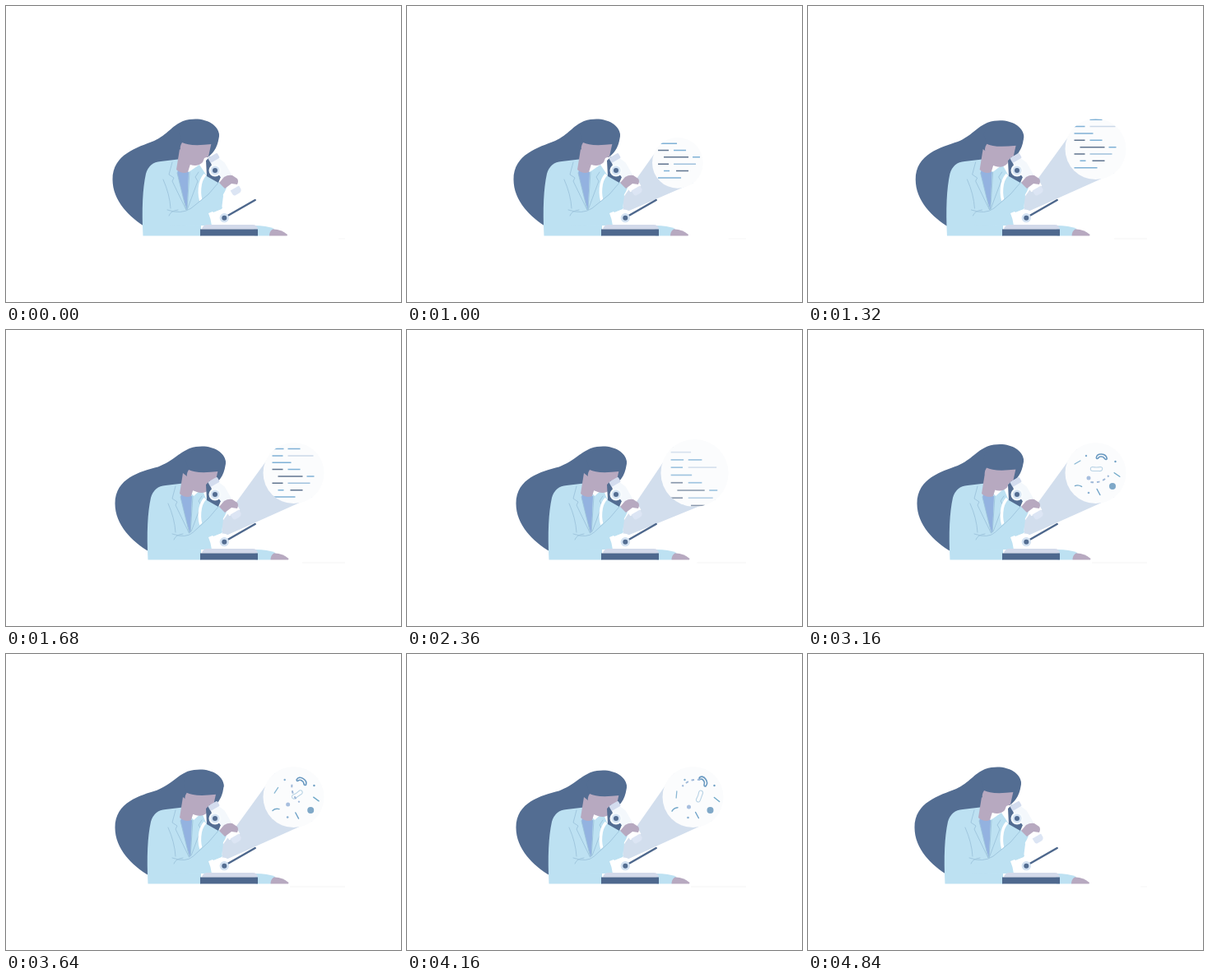
An HTML page for the animation above (5000 ms loop, 480 by 360 pixels).

```html
<!DOCTYPE html>
<html lang="en">
<head>
<meta charset="utf-8">
<title>Microscope</title>
<style>
html, body { margin: 0; width: 100%; height: 100%; overflow: hidden; background: #fff; }
svg { display: block; width: 100vw; height: 100vh; }
.hair { fill: #536d92; }
.coat { fill: #bde1f2; }
.skin { fill: #b7a9c0; }
.seam { fill: none; stroke: #9cc3dc; stroke-width: .9; stroke-linecap: round; stroke-linejoin: round; }
</style>
</head>
<body>
<svg viewBox="0 0 480 360">
  <defs><clipPath id="clip"><circle id="clipDisc"/></clipPath></defs>

  <path id="ground" stroke="#f9f9f9" stroke-width="1.4"/>
  <path id="beam" fill="#d2deed"/>
  <circle id="disc" fill="#fbfcfd"/>
  <g clip-path="url(#clip)">
    <g id="text"></g>
    <g id="germs" fill="none" stroke-linecap="round"></g>
  </g>

  <path id="hair" class="hair"/>
  <path id="coat" class="coat"/>
  <g id="chest">
    <path fill="#93b2e0" d="M209 199 L222 202 L220 248 Q213 228 207 208 Z"/>
    <path class="coat" d="M209 189 L208 203 L219 248 L206 222 L198 200 Z"/>
    <path class="seam" d="M202 190 L198 205 L204 209 L202 213 L219 248 M208 203 L219 248 M223 202 L220 248 L233 213 L230 208 L234 202"/>
    <path class="skin" d="M211 174 L207 199 Q214 205 221 202 L226 186 Z"/>
  </g>
  <g id="head">
    <path class="skin" d="M212 178 L216 190 L224 193 Q233 196 239 190 L241 185 L246 183 L250 165 L225 158 L214 166 Q210 172 213 178 Z"/>
    <path class="hair" d="M214 166 Q223 171 250 168 Q257 166 259 158 Q256 143 238 139 Q216 139 210 154 Z"/>
  </g>

  <path class="hair" d="M243 188 L248 183 L250 195 L261 208 L258 215 L244 207 Z"/>
  <path d="M242 205 C234 213 234 230 238 240" fill="none" stroke="#fff" stroke-width="3.6"/>

  <g transform="translate(251 185) rotate(-30)">
    <path fill="#f4f8fc" d="M-5 3 H6 L10 12 V38 H-3 V14 Z"/>
    <path fill="#fff" d="M-4 35 H12 V46 H-3 Z"/>
    <path fill="#dce5f4" d="M-1 45 H11 V50 Q10 53 7 53 H2 Q-1 53 -1 50 Z"/>
    <rect x="-5" y="-3" width="13" height="7" rx="1.5" fill="#d3dcee"/>
  </g>
  <circle cx="254" cy="200" r="7.5" fill="#f7fbfd"/>
  <circle cx="254" cy="200" r="5.4" fill="#d3e2f2"/>
  <circle cx="254" cy="200" r="3" class="hair"/>

  <path id="arm" class="coat"/>
  <path id="armSeam" class="seam"/>
  <path class="skin" d="M259 215 L265 208 Q270 205 275 206 L281 210 Q283 213 281 217 L274 216 L266 222 Z"/>

  <path fill="#fff" d="M246 252 L251 250 Q254 253 257 250 Q264 245 271 250 Q275 257 274 267 H250 Q249 259 246 252 Z"/>
  <path d="M266 257 L302.7 236" stroke="#4d678c" stroke-width="2.5" stroke-linecap="round"/>
  <circle cx="265.3" cy="257.7" r="5.6" fill="#d3e2f2"/>
  <circle cx="265.3" cy="257.7" r="3" class="hair"/>
  <g id="rest">
    <path class="coat" d="M301 267 Q317 267 326 271 L320 279.5 H302 Z"/>
    <path class="skin" d="M320 279.5 Q320 274 324 271.5 Q334 271 342 278 L341.5 279.5 Z"/>
  </g>
  <path fill="#d2d9ea" d="M238 271.5 Q239 266 245 266 H300 Q305 266 306 271.5 Z"/>
  <rect x="236" y="271.5" width="70" height="8" fill="#4e688e"/>
</svg>
<script>
const LOOP = 5000, STEP = 40;
const el = id => document.getElementById(id);
const set = (node, attrs) => { for (const k in attrs) node.setAttribute(k, attrs[k]); };
const add = (parent, tag, attrs) => {
  const node = document.createElementNS('http://www.w3.org/2000/svg', tag);
  set(node, attrs);
  return parent.appendChild(node);
};
const mix = (a, b, k) => a + (b - a) * k;
const ease = (t, from, to) => {
  const k = Math.min(1, Math.max(0, (t - from) / (to - from)));
  return k * k * (3 - 2 * k);
};

// Lines of writing, top to bottom: [start, length, colour] triples.
const B = '#7fb1d6', D = '#60758f', L = '#cbd8e8';
const rows = [
  [[0, 22, L]],
  [[0, 14, B], [19, 15, B]],
  [[0, 13, B], [19, 31, L]],
  [[0, 23, B]],
  [[0, 13, D], [19, 15, B]],
  [[7, 30, D], [42, 9, B]],
  [[0, 13, D], [19, 27, '#a0c2dd']],
  [[7, 7, B], [22, 15, D]],
  [[0, 28, B]]
];
rows.forEach((row, i) => row.forEach(([x, w, color]) =>
  add(el('text'), 'path', { d: `M${x - 26} ${4 + 8.35 * (i - 5)}h${w}`, stroke: color, 'stroke-width': 1.5 })));

// Germs: shape, style and two places [x, y, angle] one second apart.
const bean = 'M-6 2 Q-6 -3 0 -3 Q6 -3 7 2 Q6 4 4 2 Q3 0 0 0 Q-3 0 -3.5 2 Q-5 4 -6 2Z';
const pill = 'M-5 -2.5 Q0 -1.5 5 -2.5 Q8 -2 7 1 Q6 3 3 2.5 H-4 Q-8 2.5 -7 -1 Q-7 -2 -5 -2.5Z';
const rod = 'M-4 0H4', curl = 'M-4 1Q-1 -2 4 -1';
const dot = r => `M${-r} 0a${r} ${r} 0 1 0 ${2 * r} 0a${r} ${r} 0 1 0 ${-2 * r} 0`;
const germs = [
  [bean, { stroke: '#6999c1', 'stroke-width': 1.6 }, [7, -20, 5], [13, -20, 55]],
  [pill, { stroke: '#b9d3e5', 'stroke-width': 1.1 }, [1, -5, 0], [8, -1, -70]],
  ['M-11 3Q2 5 11 -5', { stroke: '#9eb8d8', 'stroke-width': 2, 'stroke-dasharray': '3.5 4', 'stroke-linecap': 'butt' }, [5, 8, 0], [-2, -18, 180]],
  [dot(4), { fill: '#7fa8c8' }, [20.5, 16, 0], [21, 16, 0]],
  [dot(2.5), { fill: '#a8bfdf' }, [-8.5, 6, 0], [-5, 12, 0]],
  [dot(1.2), { fill: '#84aecf' }, [-11.5, -21, 0], [-10, -21, 0]],
  [dot(1.2), { fill: '#6e9ec3' }, [24, -14, 0], [26, -14, 0]],
  [dot(1.3), { fill: '#8db2d3' }, [-8.5, 24, 0], [-6, 25, 0]],
  [rod, { stroke: '#8ab8d4', 'stroke-width': 1.3 }, [-22, -13, -30], [-20, -3, -85]],
  [rod, { stroke: '#71a9c9', 'stroke-width': 1.4 }, [26, 2, 34], [29, 3, 38]],
  [curl, { stroke: '#76a9ca', 'stroke-width': 1.4 }, [-21, 16, 20], [-22, 15, -18]],
  [rod, { stroke: '#6fa2c8', 'stroke-width': 1.4 }, [3.5, 23, 62], [5, 22, 62]]
].map(([d, style, a, b]) => ({ a, b, node: add(el('germs'), 'path', { d, ...style }) }));

function drawBody(lean, nod) {
  const b = 6 * lean, hx = 8 * nod, hy = 4 * nod, s = 3 * lean;
  const p = (x, y, k = 1) => `${x + hx * k} ${y + hy * k}`;
  set(el('head'), { transform: `translate(${hx} ${hy})` });
  set(el('chest'), { transform: `translate(${4 * lean} 0)` });
  set(el('rest'), { transform: `translate(${1.5 * lean} 0)` });
  set(el('hair'), { d: `M${p(245, 184)} Q${p(258, 175)} ${p(259, 156)} C${p(257, 142)} ${p(237, 133)} ${p(215, 140)}
    C${p(201, 146)} ${p(197, 156, .8)} ${p(180, 164, .6)} C${160 + s} 172 ${129.5 + s} 180 ${129.5 + s} 211
    C${129.5 + s} 237 ${150 + s} 257 ${170 + s} 269 L${215 + b} 240 L${p(216, 170)} Z` });
  set(el('coat'), { d: `M${166.5 + b} 279.5 Q${164 + b} 231 ${170 + b} 204 Q${174 + b} 190 ${188 + b} 189
    L${209 + b} 186.5 L${222 + b} 202 L${235 + b * .5} 193 L243 205 L258 213 L264 231 L262 247 L249 252 L250 267 H237 V279.5 Z` });
  set(el('arm'), { d: `M${203 + b} 248 Q${213 + b} 252 223 247 L246 229 L259 214 Q265 215 268 221
    Q264 231 259 235 L263 246 L249 252 L250 267 H237 L${200 + b} 268 Z` });
  set(el('armSeam'), { d: `M${191 + b} 211 Q${199 + b} 229 ${200 + b} 246 M${196 + b} 248
    Q${213 + b} 254 ${225 + b * .4} 246 L246 229 L258 215 M${198 + b} 255 Q${200 + b} 249 ${209 + b} 248` });
}

function drawView(t) {
  const open = ease(t, 600, 1190) * (1 - ease(t, 4440, 4800));
  const pulse = 1 + .11 * ease(t, 2220, 2360) * (1 - ease(t, 2400, 2560));
  const sway = -2 * ease(t, 3600, 4160);
  const cx = mix(265, 349.5 + sway, open), cy = mix(243, 174, open);
  const r = 37 * Math.pow(open, .65) * pulse;
  for (const id of ['disc', 'clipDisc']) set(el(id), { cx, cy, r });

  // Cone edges touch the disc on both sides of its axis.
  const ax = cx - 262, ay = cy - 243, len = Math.hypot(ax, ay) || 1;
  const nx = ay / len * r, ny = -ax / len * r;
  set(el('beam'), {
    d: `M262 234 L${cx + nx} ${cy + ny} L${cx - nx} ${cy - ny} L263 252 Z`,
    visibility: open > .02 ? 'visible' : 'hidden'
  });

  const u = (t - 1000) / 1000, scroll = 13.2 * u + 4.3 * u * u - 11;
  set(el('text'), {
    transform: `translate(${cx + (1 - open) * 9} ${cy}) scale(${pulse}) translate(0 ${scroll})`,
    opacity: 1 - ease(t, 2280, 2520)
  });
  set(el('germs'), { transform: `translate(${cx} ${cy}) scale(${pulse})`, opacity: ease(t, 2400, 2640) });
  const k = (t - 3160) / 1000;
  for (const { a, b, node } of germs) {
    const [x, y, turn] = a.map((v, i) => mix(v, b[i], k));
    set(node, { transform: `translate(${x} ${y}) rotate(${turn})` });
  }

  const spread = (ease(t, 600, 1700) * 44 + ease(t, 1700, 3000) * 15) * (1 - ease(t, 4440, 4840));
  set(el('ground'), { d: `M${404 - spread} 283H412` });
}

function draw(ms) {
  const t = Math.min(4840, Math.floor(ms % LOOP / STEP) * STEP);
  const back = 1 - ease(t, 4460, 4840);
  const lean = ease(t, 1100, 1600) * back;
  const rise = ease(t, 2400, 2780) * (1 - ease(t, 3380, 3880));
  drawBody(lean, lean * (1 - .62 * rise));
  drawView(t);
}

const start = performance.now();
function tick() {
  draw(performance.now() - start);
  requestAnimationFrame(tick);
}
tick();
</script>
</body>
</html>
```
